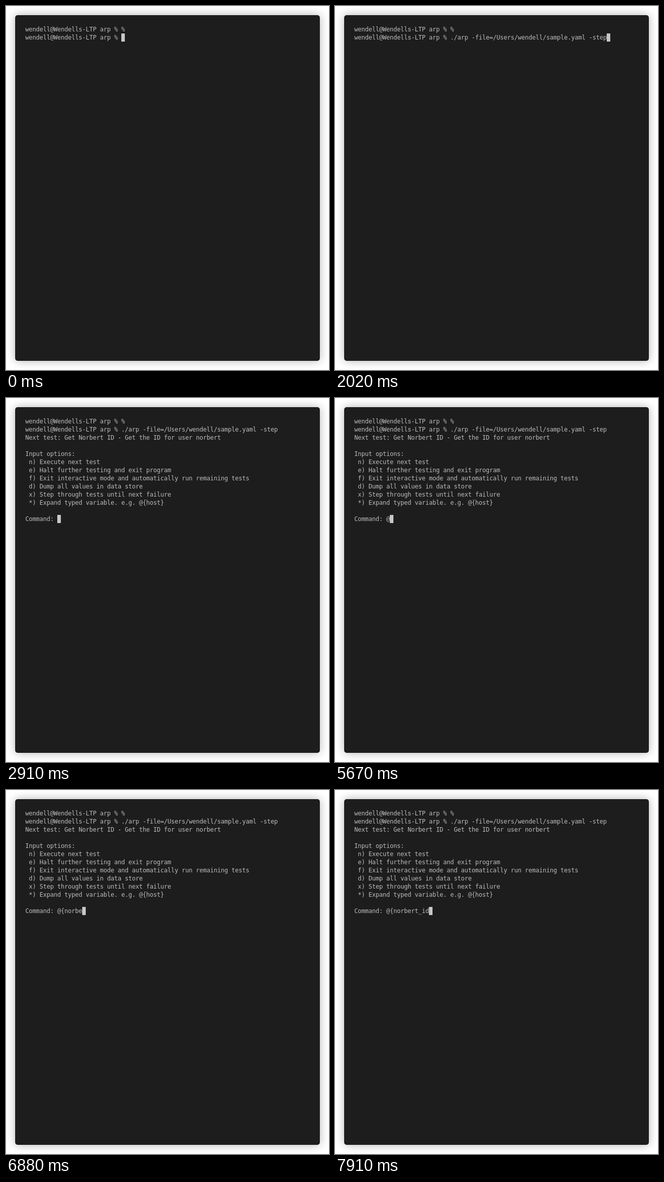
These frames come from a looping animation (636 by 716 pixels, 8000 ms). An HTML page with a canvas:

```html
<!DOCTYPE html>
<html lang="en">
<head>
<meta charset="utf-8">
<title>Terminal session</title>
<style>
  html, body { margin: 0; width: 100%; height: 100%; overflow: hidden; background: #fff; }
  canvas {
    position: absolute; left: 18px; top: 18px;
    background: #1d1d1d; border-radius: 5px; box-shadow: 0 0 18px #b3b3b3;
  }
</style>
</head>
<body>
<canvas width="600" height="680"></canvas>
<script>
const LOOP = 8000, CELL = 7, ROW = 16, PAD = 20;
const PASTE = 1100, ACCEPT = 2020, ENTER = 2810, OUTPUT = 2910;
const KEY_TIMES = [5670, 5970, 6300, 6380, 6540, 6670, 6880, 7060, 7240, 7540, 7810, 7910];

const prompt = 'wendell@Wendells-LTP arp % ';
const command = './arp -file=/Users/wendell/sample.yaml -step';
const typed = '@{norbert_id';
const output = `Next test: Get Norbert ID - Get the ID for user norbert

Input options:
 n) Execute next test
 e) Halt further testing and exit program
 f) Exit interactive mode and automatically run remaining tests
 d) Dump all values in data store
 x) Step through tests until next failure
 *) Expand typed variable. e.g. @{host}

Command: `.split('\n');

const ctx = document.querySelector('canvas').getContext('2d');

// Every character sits on the terminal grid; returns the column after the text.
function write(text, col, row, italic = false) {
  ctx.font = `${italic ? 'italic ' : ''}12px "DejaVu Sans Mono", monospace`;
  ctx.fillStyle = '#bbb';
  for (const char of text) ctx.fillText(char, PAD + CELL * col++, PAD + ROW * row + 12);
  return col;
}

function cursor(col, row) {
  ctx.fillStyle = '#c7c7c7';
  ctx.fillRect(PAD + CELL * col, PAD + ROW * row, CELL, ROW);
}

function draw(time) {
  ctx.clearRect(0, 0, 600, 680);
  write('%', write(prompt, 0, 0), 0, true);
  let col = write(prompt, 0, 1), row = 1;
  if (time >= PASTE) col = write(command, col, 1, time < ACCEPT);
  if (time >= ENTER) [col, row] = [0, 2];
  if (time >= OUTPUT) {
    output.forEach((line, i) => { col = write(line, 0, row = i + 2); });
    const count = KEY_TIMES.filter(key => key <= time).length;
    col = write(typed.slice(0, count), col, row);
  }
  cursor(col, row);
}

function tick() {
  draw(performance.now() % LOOP);
  requestAnimationFrame(tick);
}
tick();
</script>
</body>
</html>
```
